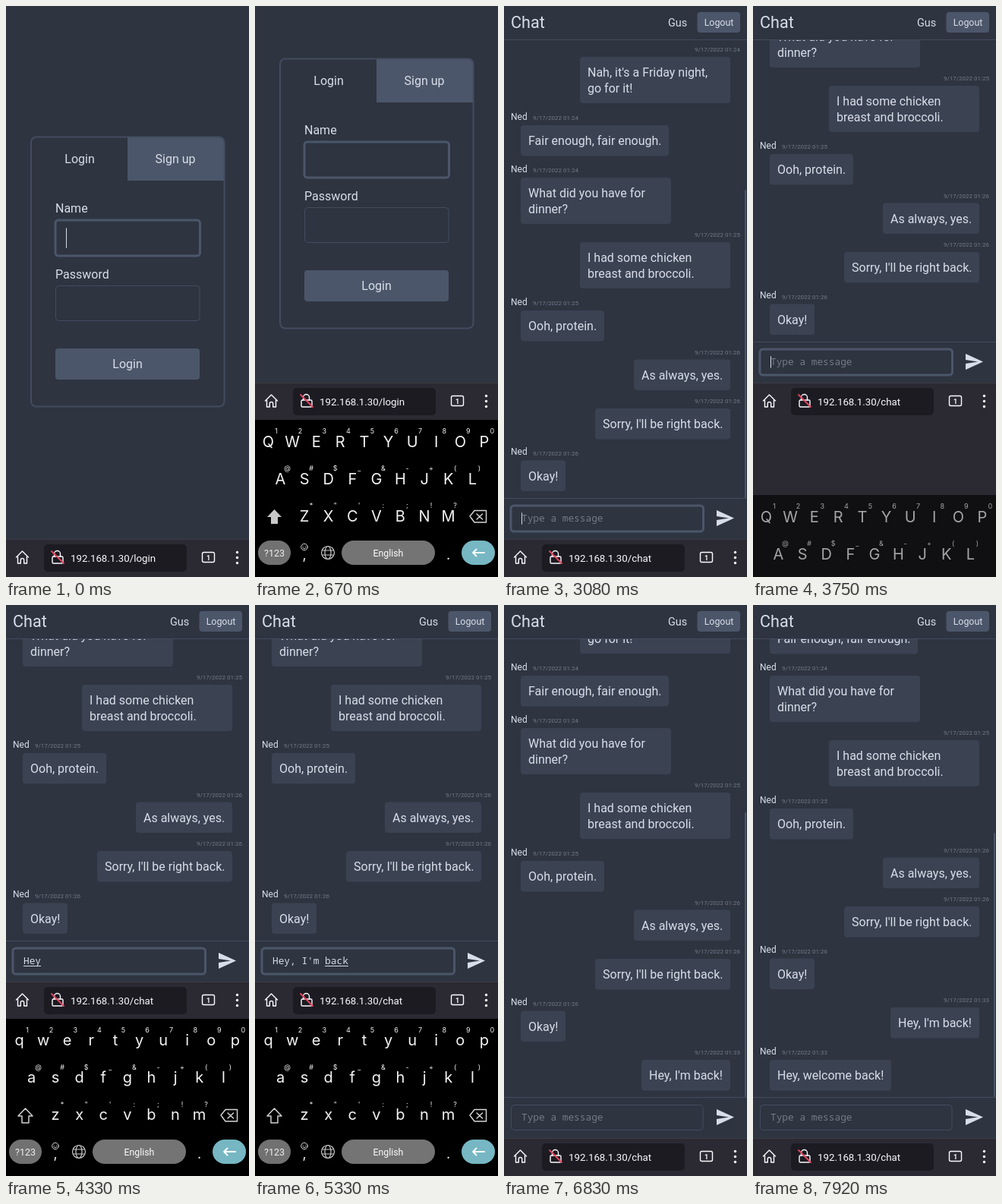
An HTML page that plays this animation: 320 by 752 pixels, repeating every 8000 ms.

```html
<!DOCTYPE html>
<html lang="en">
<head>
<meta charset="utf-8">
<title>Chat login</title>
<style>
  html, body { margin: 0; width: 100%; height: 100%; overflow: hidden; background: #2e3440; }
  svg { display: block; width: 100%; height: 100%; font-family: Roboto, sans-serif; }
  text { white-space: pre; }
  .key { font-family: Inter, Roboto, sans-serif; }
  .mono { font-family: "Noto Sans Mono", "DejaVu Sans Mono", monospace; }
</style>
</head>
<body>
<svg id="stage" viewBox="0 0 320 752"></svg>
<script>
const LOOP = 8000;
const BG = '#2e3440', BUBBLE = '#3b4252', LINE = '#434c5e', ACCENT = '#4c566a';
const INK = '#d8dee9', DIM = '#747b88', CHROME = '#2b2a33', WHITE = '#fbfbfe';

// Markup helpers
const rect = (x, y, w, h, fill, rx = 0, more = '') =>
  `<rect x="${x}" y="${y}" width="${w}" height="${h}" rx="${rx}" fill="${fill}" ${more}/>`;
const box = (x, y, w, h, rx, color, width, more = '') =>
  rect(x, y, w, h, 'none', rx, `stroke="${color}" stroke-width="${width}" ${more}`);
const text = (x, y, size, str, fill = INK, more = '') =>
  `<text x="${x}" y="${y}" font-size="${size}" fill="${fill}" ${more}>${str.replace(/&/g, '&amp;')}</text>`;
const path = (d, more) => `<path d="${d}" ${more}/>`;
const group = (id, body) => `<g id="${id}">${body}</g>`;
const MID = 'text-anchor="middle"', END = 'text-anchor="end"';
const outline = (color, width) =>
  `fill="none" stroke="${color}" stroke-width="${width}" stroke-linejoin="round" stroke-linecap="round"`;

// A text field: thin border, focus border, value, composing underline, caret
const field = (id, x, y, w, h, tx, base, size, cls) => group(id,
  box(x + .5, y + .5, w - 1, h - 1, 4, LINE, 1, 'class="thin"') +
  box(x, y, w, h, 4, ACCENT, 3, 'class="focus"') +
  text(tx, base, size, '', INK, `class="value ${cls}"`) +
  rect(tx, base + 2, 0, 1, INK, 0, 'class="under"') +
  rect(tx, y + h / 2 - size * .6, 1, size * 1.2, INK, 0, 'class="caret"'));

function loginView() {
  return group('login',
    path('M160 173H280Q287 173 287 180V230H160Z', `fill="${ACCENT}"`) +
    box(33, 172.5, 254.5, 355, 7, LINE, 2) +
    text(97, 207, 16, 'Login', INK, MID) + text(223, 207, 16, 'Sign up', INK, MID) +
    text(65, 272, 16, 'Name') + field('name', 65, 282, 190.5, 47, 79, 313, 22, '') +
    text(65, 358.5, 16, 'Password') + field('pass', 65, 368, 190.5, 47, 79, 399.5, 22, '') +
    rect(65, 451, 190, 41, ACCENT, 4) + text(160, 477, 16, 'Login', INK, MID));
}

// [mine, bubble top, bubble width, minute, lines...]
const MESSAGES = [
  [1, 67, 198, 24, "Nah, it's a Friday night,", 'go for it!'],
  [0, 157, 195, 24, 'Fair enough, fair enough.'],
  [0, 226, 198, 24, 'What did you have for', 'dinner?'],
  [1, 311, 198, 25, 'I had some chicken', 'breast and broccoli.'],
  [0, 401, 110, 25, 'Ooh, protein.'],
  [1, 465.5, 127, 26, 'As always, yes.'],
  [1, 530, 178, 26, "Sorry, I'll be right back."],
  [0, 598.5, 59, 26, 'Okay!'],
  [1, 663, 117, 33, "Hey, I'm back!"],
  [0, 732, 160, 33, 'Hey, welcome back!']
];

function message([mine, top, width, minute, ...lines]) {
  const x = mine ? 298 - width : 22;
  const stamp = '9/17/2022 01:' + minute;
  const head = mine
    ? text(311, top - 7, 8, stamp, DIM, END)
    : text(9, top - 7.5, 12, 'Ned') + text(38, top - 7, 8, stamp, DIM);
  return head + rect(x, top, width, lines.length > 1 ? 61 : 40.5, BUBBLE, 4) +
    lines.map((s, i) => text(x + 10, top + 26 + 21 * i, 16, s)).join('');
}

function chatView() {
  return group('chat',
    group('list', MESSAGES.map(message).join('')) +
    rect(317, 242, 2, 406, ACCENT, 1, 'id="thumb"') +
    rect(0, 0, 320, 44, BG) + rect(0, 44, 320, 1, LINE) +
    text(9, 29, 21.6, 'Chat') + text(216, 26.5, 14.4, 'Gus') +
    rect(254.5, 8, 56.5, 27, ACCENT, 4) + text(283, 26, 12.4, 'Logout', INK, MID) +
    group('footer',
      rect(0, 648, 320, 54, BG) + rect(0, 648, 320, 1, LINE) +
      field('draft', 9, 658, 253.5, 34, 23, 679, 12.8, 'mono') +
      text(23, 679, 12.8, 'Type a message', DIM, 'id="hint" class="mono"') +
      path('M280 664L303 674.5L280 685V677L296 674.5L280 672Z', `fill="${INK}"`)));
}

function addressBar() {
  return group('bar',
    rect(0, 702, 320, 50, CHROME) + rect(0, 702, 320, 1, '#3d3c46') +
    rect(50, 709, 188, 36, '#1c1b22', 5) +
    path('M13.5 726L21.5 718L29.5 726M15.5 725V734H19.3V729.5Q19.3 727.5 21.5 727.5Q23.7 727.5 23.7 729.5V734H27.5V725', outline(WHITE, 1.4)) +
    path('M63.5 725V721.5A4 4 0 0 1 71.5 721.5V725', outline(WHITE, 1.4)) +
    box(61, 725, 14, 9, 1.5, WHITE, 1.4) +
    path('M60 718L76 734', outline('#e8455f', 1.8)) +
    text(85, 731.5, 13.3, '', WHITE, 'id="url"') +
    box(258.5, 719.5, 16, 13, 2, WHITE, 1.4) +
    text(266.5, 729.5, 9, '1', WHITE, MID + ' font-weight="700"') +
    [719.5, 726.5, 733.5].map(y => `<circle cx="304.5" cy="${y}" r="1.7" fill="${WHITE}"/>`).join(''));
}

// Keyboard rows: letters, small symbols, first x, baseline
const ROWS = [
  ['qwertyuiop', '1234567890', 17.5, 581],
  ['asdfghjkl', '@#$_&-+()', 33.5, 630],
  ['zxcvbnm', '*"\':;!?', 65, 679]
];
const PITCH = 31.6;
const key = (x, y, s, size = 20) => text(x, y, size, s, '#f4f4f4', MID + ' class="key"');
const keys = (s, x, y, size) => [...s].map((c, i) => key(x + PITCH * i, y, c, size)).join('');
const upperKeys = () => ROWS.map(([s, , x, y]) => keys(s.toUpperCase(), x, y)).join('');
const lowerKeys = () => ROWS.map(([s, , x, y]) => keys(s, x, y - 1)).join('');
const marks = row => keys(row[1], row[2] + (row === ROWS[0] ? 10.5 : 9), row[3] - 18, 9);

function keyboard() {
  const arrow = 'M25.5 663L35 673H30V682H21V673H16Z';
  return group('kb',
    rect(0, 545, 320, 420, '#000') +
    group('digits', rect(0, 506, 320, 39, '#303030') + keys('1234567890', 17.5, 534)) +
    group('upper', upperKeys() + path(arrow, 'fill="#c9c9c9"')) +
    group('lower', lowerKeys() + path(arrow, outline('#d0d0d0', 1.5))) +
    group('topMarks', marks(ROWS[0])) + marks(ROWS[1]) + marks(ROWS[2]) +
    path('M283 672L289 664.5H304.5V680H289ZM292 669L299.5 676M299.5 669L292 676', outline('#d8d8d8', 1.4)) +
    rect(4, 704, 43, 32, '#717171', 16) + text(25.5, 724.5, 12.5, '?123', '#f0f0f0', MID) +
    group('smile', `<circle cx="65" cy="712.5" r="4.3" ${outline('#ddd', 1)}/>` +
      path('M63.3 711.3V711.4M66.7 711.3V711.4M62.8 713.6Q65 716 67.2 713.6', outline('#ddd', 1))) +
    key(65, 729, ',', 18) + key(254.5, 729, '.', 18) +
    `<circle cx="96" cy="720" r="8.5" ${outline('#ccc', 1.2)}/>` +
    `<ellipse cx="96" cy="720" rx="4" ry="8.5" ${outline('#ccc', 1.2)}/>` +
    path('M88.5 717H103.5M88.5 723H103.5', outline('#ccc', 1.2)) +
    rect(114, 704, 123, 32, '#747474', 16) + text(175.5, 724.5, 12.3, 'English', '#fff', MID) +
    rect(272, 704, 44, 32, '#76b7c3', 16) +
    path('M302 720H287M291.5 715.5L287 720L291.5 724.5', outline('#fff', 1.8)));
}

document.getElementById('stage').innerHTML =
  rect(0, 0, 320, 752, BG) + loginView() + chatView() +
  rect(0, 545, 320, 207, CHROME, 0, 'id="gap"') + addressBar() + keyboard();

const $ = id => document.getElementById(id);
const show = (el, on) => el.setAttribute('display', on ? 'inline' : 'none');
const shift = (id, y) => $(id).setAttribute('transform', `translate(0 ${y})`);

// Timeline in ms
const CHAT_AT = 2880, PASS_AT = 1420, SEND_TAP = 6180, SENT_AT = 6480, REPLY_AT = 7810;
const SESSIONS = [[130, 2600], [3690, SEND_TAP]];
const OPEN_MS = 280, CLOSE_MS = 250;
const NAME = { str: 'Gus', at: [910, 1070, 1240] };
const PASS = { str: 'gab', at: [1740, 1990, 2180] };
const DRAFT = {
  str: "Hey, I'm back!",
  at: [4070, 4160, 4240, 4490, 4570, 4660, 4740, 4820, 4990, 5070, 5160, 5240, 5320, 5570]
};

const typed = (entry, t) => entry.str.slice(0, entry.at.filter(a => a <= t).length);
const lastHit = (entry, t, start) => Math.max(start, ...entry.at.filter(a => a <= t));

function keyboardState(t) {
  for (const [open, close] of SESSIONS) {
    if (t < open || t >= close + CLOSE_MS) continue;
    if (t >= close) {
      const p = (t - close) / CLOSE_MS;
      return { up: false, y: 207 * p ** 2.4, alpha: 1 - .5 * p };
    }
    const q = 1 - Math.min(1, (t - open) / OPEN_MS);
    return { up: true, y: 207 * q ** 3, alpha: 1 - .5 * q };
  }
  return null;
}

function setField(id, value, focused, composing, since) {
  const part = c => $(id).querySelector('.' + c);
  const node = part('value');
  if (node.textContent !== value) node.textContent = value;
  const start = +node.getAttribute('x');
  const width = value ? node.getComputedTextLength() : 0;
  const word = focused && composing ? (value.match(/[\w']+$/) || [''])[0] : '';
  const from = word ? width * (1 - word.length / value.length) : 0;
  show(part('thin'), !focused);
  show(part('focus'), focused);
  show(part('under'), word);
  part('under').setAttribute('x', start + from);
  part('under').setAttribute('width', width - from);
  show(part('caret'), focused && !word && since % 1000 < 500);
  part('caret').setAttribute('x', start + width);
}

function drawLogin(t, rise) {
  const secret = typed(PASS, t);
  const hit = lastHit(PASS, t, PASS_AT);
  const plain = t - hit < 320 ? secret.slice(-1) : '';
  const masked = '•'.repeat(secret.length - plain.length) + plain;
  shift('login', -rise / 2);
  setField('name', typed(NAME, t), t < PASS_AT, true, t - lastHit(NAME, t, 0));
  setField('pass', masked, t >= PASS_AT && t < SESSIONS[0][1], false, t - hit);
}

function drawChat(t, rise) {
  const draft = t < SENT_AT ? typed(DRAFT, t) : '';
  const begin = t < SESSIONS[1][0] ? CHAT_AT + 30 : SESSIONS[1][0];
  const added = (t >= SENT_AT) + (t >= REPLY_AT);
  const thumbTop = [242, 273, 300][added];
  shift('list', -[0, 64, 133][added] - rise);
  shift('footer', -rise);
  show($('thumb'), !rise);
  $('thumb').setAttribute('y', thumbTop);
  $('thumb').setAttribute('height', 648 - thumbTop);
  setField('draft', draft, t < SEND_TAP, true, t - lastHit(DRAFT, t, begin));
  show($('hint'), !draft);
}

function draw(t) {
  const chat = t >= CHAT_AT;
  const kb = keyboardState(t);
  const digits = t >= 1490 && !chat;
  const rise = kb && kb.up ? (digits ? 245 : 206) : 0;

  show($('login'), !chat);
  show($('chat'), chat);
  show($('gap'), kb);
  shift('bar', -rise);
  $('url').textContent = '192.168.1.30/' + (chat ? 'chat' : 'login');
  (chat ? drawChat : drawLogin)(t, rise);

  show($('kb'), kb);
  if (kb) {
    const caps = t < NAME.at[0] || (chat && t < DRAFT.at[0]);
    shift('kb', kb.y);
    $('kb').setAttribute('opacity', kb.alpha);
    show($('upper'), caps);
    show($('lower'), !caps);
    show($('digits'), digits);
    show($('topMarks'), !digits);
    show($('smile'), !digits);
  }
}

const startTime = performance.now();
function tick() {
  draw((performance.now() - startTime) % LOOP);
  requestAnimationFrame(tick);
}
tick();
</script>
</body>
</html>
```
